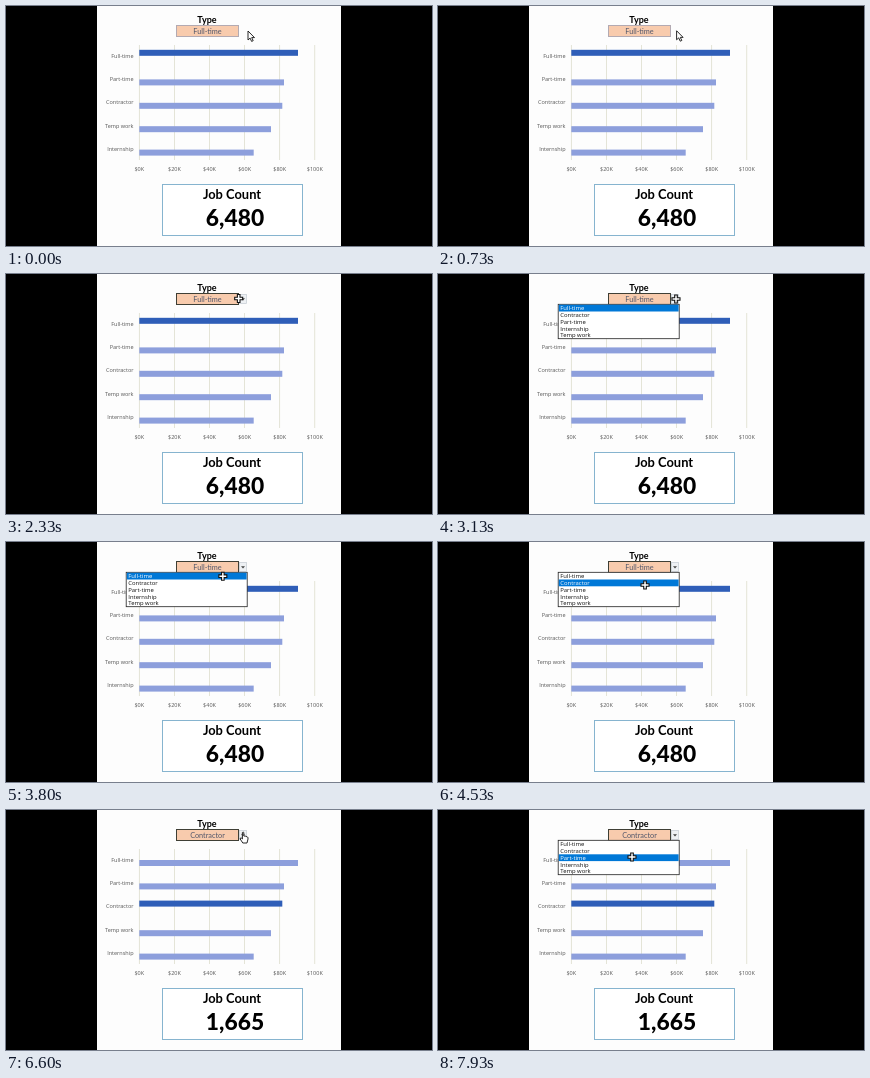
An HTML page with a canvas that plays this animation: 426x240 px, repeating every 8000 ms.

```html
<!DOCTYPE html>
<html lang="en">
<head>
<meta charset="utf-8">
<title>Job type dashboard</title>
<style>
  html, body { margin: 0; width: 100%; height: 100%; overflow: hidden; background: #000; }
  canvas { display: block; width: 426px; height: 240px; }
</style>
</head>
<body>
<canvas></canvas>
<script>
const W = 426, H = 240, LOOP = 8000;
const canvas = document.querySelector('canvas');
const ctx = canvas.getContext('2d');
const dpr = window.devicePixelRatio || 1;
canvas.width = W * dpr;
canvas.height = H * dpr;

const HEAD = 'Lato, sans-serif';
const SMALL = '"Open Sans", sans-serif';
const bars = [['Full-time', 292], ['Part-time', 278], ['Contractor', 276.3], ['Temp work', 265], ['Internship', 247.7]];
const options = ['Full-time', 'Contractor', 'Part-time', 'Internship', 'Temp work'];
const counts = { 'Full-time': '6,480', 'Contractor': '1,665' };

const CELL_CLICK = 1900, PICK = 5130;
const openings = [[2930, PICK], [6930, LOOP]];

// Pointer path: time, x, y
const path = [
  [0, 242, 25], [500, 242, 25], [1250, 227, 24], [2050, 227, 24], [2600, 238, 25], [3330, 238, 25],
  [3900, 215, 35], [4400, 207, 43], [5300, 207.5, 43], [5850, 208, 43], [6450, 238, 25],
  [7130, 238, 25], [7550, 208, 41], [7850, 194, 47], [LOOP, 194, 47]
];
// Pointer shape from each time on
const shapes = [[0, 'arrow'], [850, 'cross'], [5200, 'arrow'], [6350, 'hand'], [7230, 'cross']];

function pointerAt(t) {
  const i = path.findIndex(p => p[0] > t);
  const [t0, x0, y0] = path[i - 1], [t1, x1, y1] = path[i];
  const k = (t - t0) / (t1 - t0), e = k * k * (3 - 2 * k);
  return [x0 + (x1 - x0) * e, y0 + (y1 - y0) * e];
}

function rect(x, y, w, h, fill, stroke, width = 1) {
  if (fill) { ctx.fillStyle = fill; ctx.fillRect(x, y, w, h); }
  if (stroke) { ctx.strokeStyle = stroke; ctx.lineWidth = width; ctx.strokeRect(x, y, w, h); }
}

function text(str, x, y, size, { family = SMALL, weight = 400, color = '#555', align = 'center' } = {}) {
  ctx.font = `${weight} ${size}px ${family}`;
  ctx.fillStyle = color;
  ctx.textAlign = align;
  ctx.fillText(str, x, y);
}

const outlines = {
  arrow: new Path2D('M0 0V9L2.1 7.1L3.6 10.4L5.2 9.7L3.7 6.6H6.5Z'),
  cross: new Path2D('M-1.3 -4H1.3V-1.3H4V1.3H1.3V4H-1.3V1.3H-4V-1.3H-1.3Z'),
  hand: new Path2D('M-1.6 -2.5Q-.9 -3.5 -.2 -2.5V1L1.5 1.2L3.5 2Q4.2 2.4 4 4L3 8H-1.2L-3.8 4Q-4 2.6 -2.7 3L-1.6 4Z')
};

function drawPointer(shape, x, y) {
  ctx.save();
  ctx.translate(x, y);
  ctx.fillStyle = '#fff';
  ctx.strokeStyle = '#111';
  ctx.lineWidth = shape === 'cross' ? 1.1 : 0.9;
  ctx.fill(outlines[shape]);
  ctx.stroke(outlines[shape]);
  ctx.restore();
}

function drawChart(selected) {
  for (let i = 0; i <= 5; i++) {
    const x = 133.3 + i * 35.1;
    rect(x - 0.35, 39, 0.7, 115, '#d9d9c6');
    text(`$${i * 20}K`, x, 165, 5.5);
  }
  bars.forEach(([name, end], i) => {
    const y = 50 + i * 23.4, active = name === selected;
    rect(133.3, active ? y - 6.2 : y, end - 133.3, 6, active ? '#2f5eb8' : '#8d9fdc');
    text(name, 127.5, y + 1.6, 5.5, { align: 'right' });
  });
}

function drawCell(selected, focused) {
  text('Type', 201, 17, 9, { family: HEAD, weight: 700, color: '#000' });
  rect(170.5, 19.5, 62, 11, '#f8cbad', focused ? '#3f3f35' : '#b3aab2');
  text(selected, 201.5, 27.8, 7.3, { family: HEAD, color: '#51566a' });
  if (!focused) return;
  rect(233.5, 20.5, 7, 9, '#eef1f4', '#c3cbd2', 0.7);
  ctx.fillStyle = '#444';
  ctx.fill(new Path2D('M235 24.2H239L237 26.4Z'));
}

function drawList(highlighted) {
  rect(120.2, 30.3, 121, 34.4, '#fff', '#222', 0.8);
  options.forEach((name, i) => {
    const active = i === highlighted, y = 30.7 + i * 6.8;
    if (active) rect(120.8, y, 119.8, 6.8, '#0078d7');
    text(name, 122.3, y + 5.4, 5.9, { align: 'left', color: active ? '#fff' : '#111' });
  });
}

function draw(t) {
  const picked = t >= PICK;
  const selected = picked ? 'Contractor' : 'Full-time';
  const [x, y] = pointerAt(t);

  ctx.setTransform(dpr, 0, 0, dpr, 0, 0);
  rect(0, 0, W, H, '#000');
  rect(91, 0, 244, H, '#fdfdfd');
  drawChart(selected);
  drawCell(selected, t >= CELL_CLICK);

  rect(156.5, 178.5, 140, 51, '#fff', '#86b4cf');
  text('Job Count', 226, 193.2, 12.9, { family: HEAD, weight: 700, color: '#000' });
  text(counts[selected], 229, 219.8, 22.8, { family: HEAD, weight: 800, color: '#000' });

  if (openings.some(([from, to]) => t >= from && t < to)) {
    const hovered = Math.floor((y - 30.7) / 6.8);
    drawList(hovered >= 0 ? hovered : options.indexOf(selected));
  }
  drawPointer(shapes.filter(s => s[0] <= t).pop()[1], x, y);
}

function tick() {
  draw(performance.now() % LOOP);
  requestAnimationFrame(tick);
}
tick();
</script>
</body>
</html>
```
